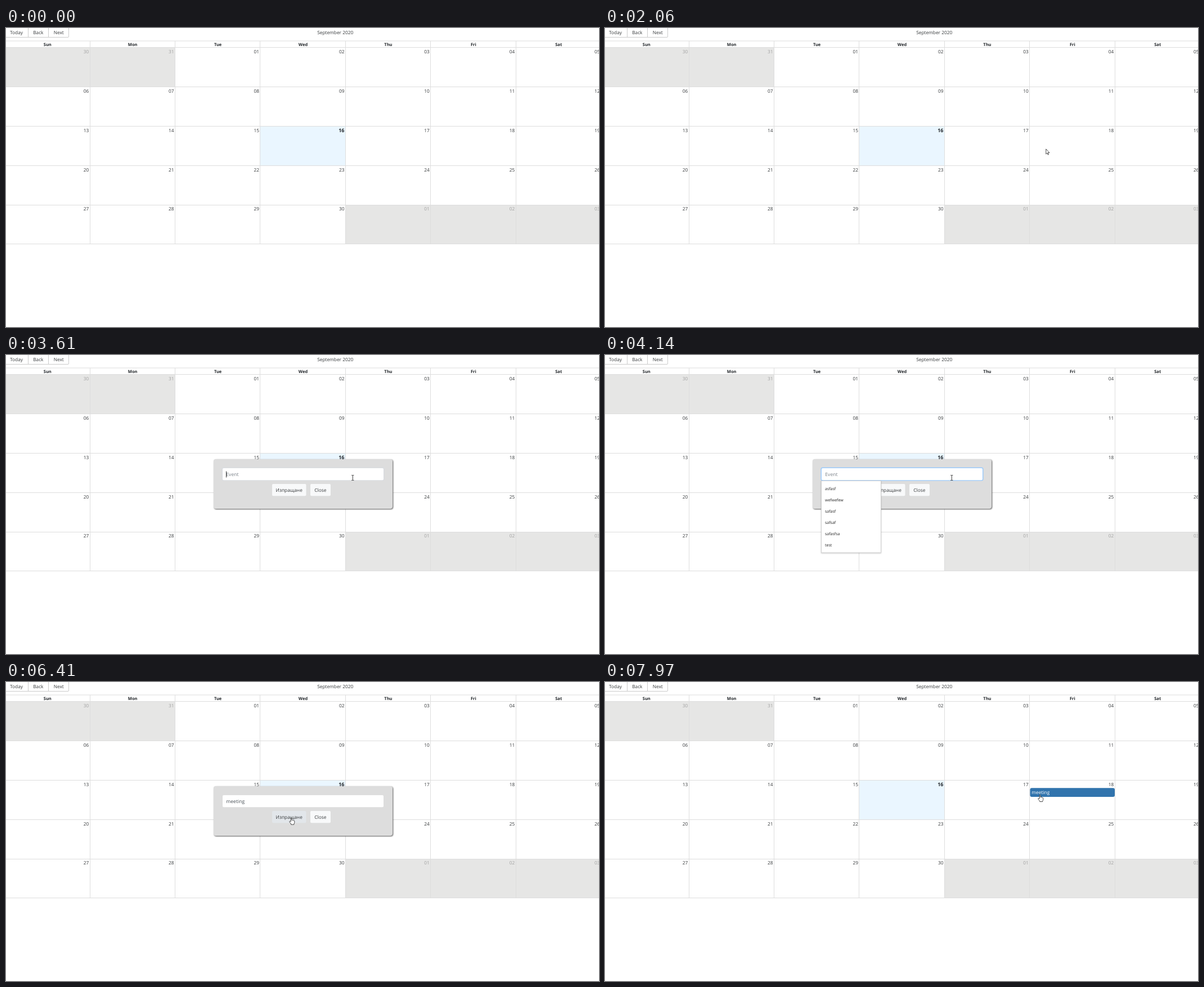
Recreate the animation shown at these times as an HTML page. Size 1054 by 531 pixels, loop 8000 ms.

```html
<!DOCTYPE html>
<html lang="en">
<head>
<meta charset="utf-8">
<title>Calendar</title>
<style>
  html, body { margin: 0; width: 100%; height: 100%; overflow: hidden; background: #fff; }
  svg { display: block; width: 1054px; height: 531px; }
  text { font: 8.32px "Open Sans", "Noto Sans", sans-serif; fill: #373a3c; text-rendering: geometricPrecision; white-space: pre; }
  .head { font-size: 7.5px; font-weight: 700; fill: #212529; }
  .today { font-size: 8.9px; font-weight: 700; fill: #212529; }
  .off { fill: #a3a3a3; }
  .end { text-anchor: end; }
  .mid { text-anchor: middle; }
  .item { font-size: 7px; fill: #222; }
  .event { font-size: 8.4px; fill: #fff; }
  #typed { font-size: 8.6px; fill: #495057; }
  #panel { filter: drop-shadow(1.5px 1.5px 1px #555); }
  #list rect { filter: drop-shadow(0 1px 1px #0003); }
</style>
</head>
<body>
<svg viewBox="0 0 1054 531">
  <g id="calendar"></g>
  <g id="booking">
    <rect x="755.5" y="188.3" width="150.5" height="15.6" rx="3" fill="#3174ad"/>
    <text class="event" x="758.3" y="199.3">meeting</text>
  </g>
  <g id="modal">
    <rect id="panel" x="369" y="185" width="318" height="88" rx="4" fill="#ddd"/>
    <rect id="glow" x="383.5" y="199.5" width="289" height="24" rx="3" fill="#9ccbfb"/>
    <rect x="385" y="201" width="286" height="21.3" rx="2" fill="#fff"/>
    <text id="typed" x="391.3" y="215"></text>
    <rect id="caret" y="206.5" width="1" height="11" fill="#333"/>
    <rect id="submit" x="473" y="229" width="60.5" height="21.3" rx="2"/>
    <text class="mid" x="503.2" y="242.8">Изпращане</text>
    <rect x="541" y="229" width="36" height="21.3" rx="2" fill="#f8f9fa"/>
    <text class="mid" x="558.8" y="242.8">Close</text>
  </g>
  <g id="list">
    <rect x="384.5" y="223.5" width="106" height="127.5" fill="#fff" stroke="#c8c8c8" stroke-width=".8"/>
  </g>
  <g id="cursor" stroke-linejoin="round">
    <path id="arrow" d="M.4 .4V9.4L2.5 7.5L3.9 10.7L5.2 10.1L3.8 7H6.6Z" fill="#fff" stroke="#222" stroke-width=".8"/>
    <path id="beam" d="M-2 .5H-.5L0 1L.5 .5H2M0 1V9M-2 9.5H-.5L0 9L.5 9.5H2" fill="none" stroke="#222" stroke-width=".9"/>
    <path id="hand" d="M-1.6 7V1.2Q-1.6 .4-.8 .4Q0 .4 0 1.2V4.4Q1.4 3.8 1.7 4.9Q3 4.4 3.3 5.5Q4.8 5.2 4.8 6.6V8.8Q4.6 10.4 3.8 11.3V12.5H-1.3V11.3L-4.1 7.9Q-4.4 6.3-3 6.4Z" fill="#fff" stroke="#222" stroke-width=".8"/>
  </g>
</svg>
<script>
const LOOP = 8000, COL = 151.4, ROW = 69.8;
const $ = id => document.getElementById(id);
const rect = (x, y, w, h, fill) => `<rect x="${x}" y="${y}" width="${w}" height="${h}" fill="${fill}"/>`;
const text = (cls, x, y, s) => `<text class="${cls}" x="${x}" y="${y}">${s}</text>`;
const lineX = i => Math.floor(149.1 + COL * (i - 1));
const lineY = i => Math.floor(34.8 + ROW * i);

function drawCalendar() {
  let cells = '', lines = '', labels = '';
  for (let i = 0; i < 35; i++) {
    const col = i % 7, row = Math.floor(i / 7), day = i - 1;
    const off = day < 1 || day > 30, today = day === 16;
    const shown = day < 1 ? day + 31 : day > 30 ? day - 30 : day;
    if (off || today) {
      const x = lineX(col), y = lineY(row);
      cells += rect(x, y, lineX(col + 1) - x, lineY(row + 1) - y, off ? '#e6e6e5' : '#eaf6ff');
    }
    labels += text('end ' + (off ? 'off' : today ? 'today' : ''), 147.2 + COL * col, 45.2 + ROW * row,
      String(shown).padStart(2, '0'));
  }
  ['Sun', 'Mon', 'Tue', 'Wed', 'Thu', 'Fri', 'Sat'].forEach((name, i) => {
    labels += text('head mid', 73.8 + COL * i, 32, name);
    if (i) lines += rect(lineX(i), 23, 1, 361, '#ddd');
  });
  for (let i = 0; i < 6; i++) lines += rect(0, lineY(i), 1054, 1, '#ddd');
  lines += rect(0, 22.5, 1054, 1, '#ddd');

  lines += '<path d="M0 16.5H110Q111.5 16.5 111.5 15V0M39.5 0V16.5M75.5 0V16.5" fill="none" stroke="#ccc"/>';
  [['Today', 18.5], ['Back', 57.3], ['Next', 93.7]].forEach(([s, x]) => labels += text('mid', x, 11, s));
  labels += text('mid', 585.2, 11, 'September 2020');
  $('calendar').innerHTML = cells + lines + labels;
}

drawCalendar();
['asfasf', 'wefwefew', 'safasf', 'safsaf', 'safasfsa', 'test'].forEach((s, i) =>
  $('list').insertAdjacentHTML('beforeend', text('item', 391, 240 + 19.9 * i, s)));

// Pointer moves: start, end, number of steps, from, to
const moves = [
  [70, 370, 5, [975, 517], [689, 462]],
  [900, 1060, 3, [689, 462], [689, 457]],
  [1440, 2060, 9, [689, 457], [783.4, 214.5]],
  [2990, 3450, 7, [783.4, 214.5], [616.3, 213]],
  [6030, 6340, 5, [616.3, 213], [508, 240.7]],
  [6660, 6730, 2, [508, 240.7], [528, 281]],
  [6810, 6970, 3, [528, 281], [590, 374]],
  [7200, 7970, 11, [590, 374], [774, 200]],
];
const keyTimes = [4460, 4550, 4700, 4930, 5100, 5330, 5400];

function pointerAt(t) {
  const move = moves.findLast(m => t >= m[0]) || moves[0];
  const [start, end, steps, from, to] = move;
  const step = Math.floor((t - start) / (end - start) * (steps - 1) + 1e-6);
  const first = move === moves[0] ? 0 : 1;
  const p = Math.min(1, (step + first) / (steps - 1 + first));
  const eased = p * p * (3 - 2 * p);
  return from.map((v, i) => v + (to[i] - v) * eased);
}

const show = (id, on) => $(id).style.display = on ? '' : 'none';

function render(t) {
  const open = t >= 2760 && t < 6500;
  const [x, y] = pointerAt(t);
  const overInput = open && x < 671 && y > 195 && y < 222;
  const overSubmit = open && x < 533 && y > 229;
  const overEvent = t > 7200 && x > 755 && y < 204;
  const shape = overInput ? 'beam' : overSubmit || overEvent ? 'hand' : 'arrow';

  show('modal', open);
  show('booking', t >= 6500);
  show('list', t >= 3760 && t < 4460);
  $('glow').style.opacity = t < 6340 ? Math.max(0, Math.min(1, (t - 3600) / 150)) : 0;
  $('submit').setAttribute('fill', overSubmit ? '#e2e6ea' : '#f8f9fa');

  const count = keyTimes.filter(k => t >= k).length;
  const typed = $('typed');
  typed.textContent = count ? 'meeting'.slice(0, count) : 'Event';
  typed.style.fill = count ? '#495057' : '#7b838a';

  const lastKey = count ? keyTimes[count - 1] : 3610;
  show('caret', t >= 3610 && t < 6340 && (t - lastKey) % 1060 < 530);
  if (open) $('caret').setAttribute('x', 391 + (count ? typed.getComputedTextLength() : 0));

  show('cursor', t >= 70 && !(t >= 3760 && t < 3910));
  for (const id of ['arrow', 'beam', 'hand']) show(id, id === shape);
  $('cursor').setAttribute('transform', `translate(${x} ${y})`);
}

const began = performance.now();
function tick() {
  render((performance.now() - began) % LOOP);
  requestAnimationFrame(tick);
}
tick();
</script>
</body>
</html>
```
